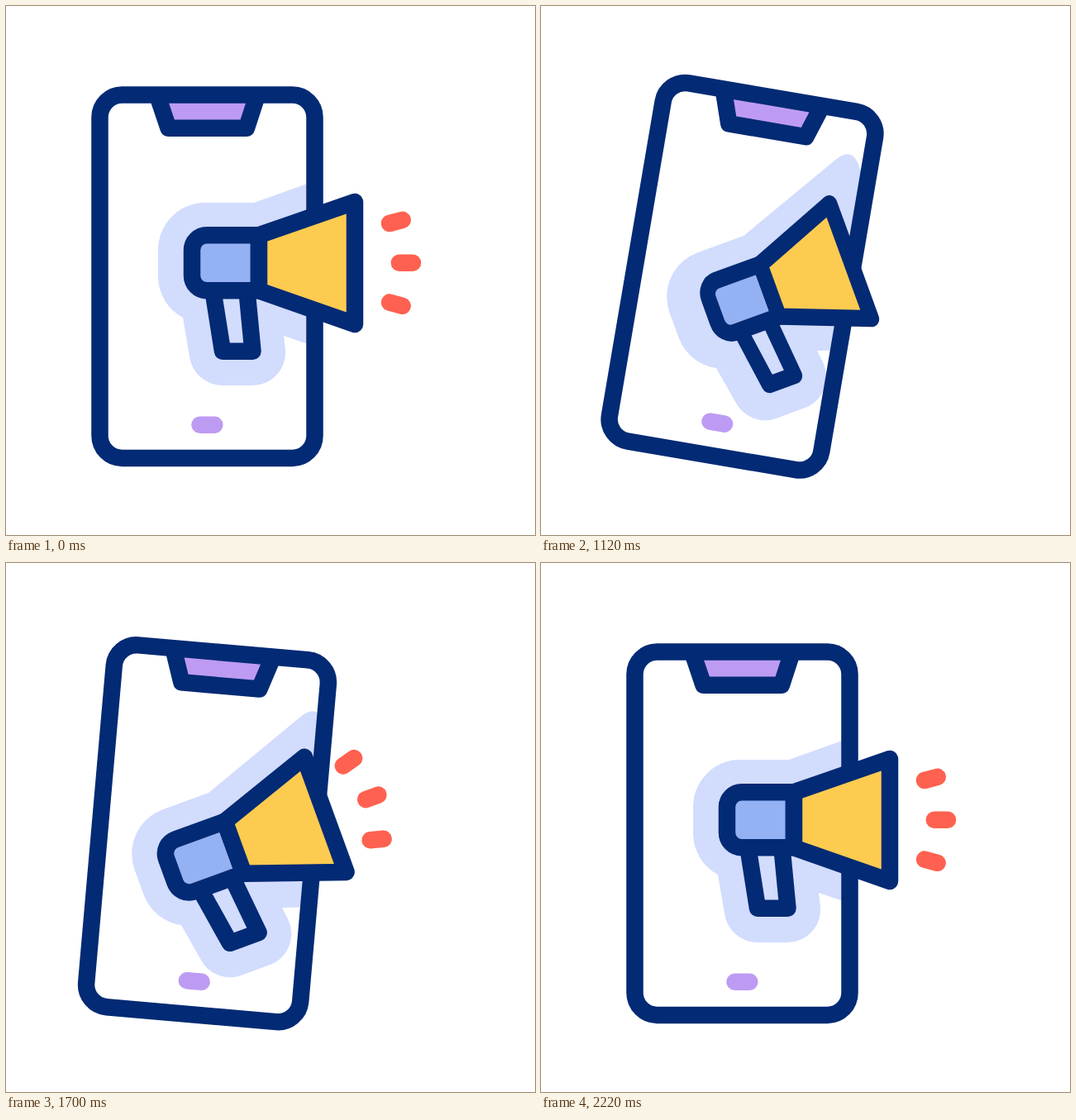
An HTML page for the animation above (2420 ms loop, 640 by 640 pixels).

```html
<!DOCTYPE html>
<html lang="en">
<head>
<meta charset="utf-8">
<title>Phone and megaphone</title>
<style>
  html, body { margin: 0; height: 100%; overflow: hidden; background: #fff; }
  svg { display: block; width: 100%; height: 100%; }
  .line { fill: none; stroke: #032a74; stroke-width: 20.5; stroke-linejoin: round; }
  .dash { fill: none; stroke: #be9bf3; stroke-width: 20.5; stroke-linecap: round; }
  #rays .dash { stroke: #ff6150; }
</style>
</head>
<body>
<svg viewBox="0 0 640 640">
  <clipPath id="screen"><rect id="screenRect" x="113.5" y="107.5" width="260" height="439.5" rx="27"/></clipPath>

  <g clip-path="url(#screen)">
    <path id="halo" fill="#d2dcfd" d="M241 238H300L436 189.5Q460 181 460 205V416Q460 441 436 433L336 399
      L338 416A40 40 0 0 1 298 459H262A40 40 0 0 1 222 424L214 377A57 57 0 0 1 184 327V295A57 57 0 0 1 241 238Z"/>
  </g>

  <g id="phone">
    <path class="line" style="fill:#be9bf3" d="M183 107.7L196.5 147.7H291L304 107.7"/>
    <rect class="line" x="113.5" y="107.5" width="260" height="439.5" rx="27"/>
    <path class="dash" d="M234.5 506.7H252.3"/>
  </g>

  <g id="horn">
    <path class="line" d="M250.5 345L262 417.7H298.5L291.5 345"/>
    <path class="line" style="fill:#94b1f3" d="M306 277.3H243a18 18 0 0 0-18 18v31a18 18 0 0 0 18 18H306Z"/>
    <path class="line" style="fill:#fdcb50" d="M306 277.3L422 237V385L306 344.3Z"/>
  </g>

  <g id="rays">
    <path class="dash" transform="translate(464 263) rotate(-15)"/>
    <path class="dash" transform="translate(475.8 310.7)"/>
    <path class="dash" transform="translate(464 358.6) rotate(15)"/>
  </g>
</svg>
<script>
const LOOP = 2420, STEP = 20, RAY = 16.2;
const $ = id => document.getElementById(id);
const rays = [...$('rays').children];

function ease(t, from, to) {
  const p = Math.min(1, Math.max(0, (t - from) / (to - from)));
  return p * p * (3 - 2 * p);
}

// Eased value through [time, value] keys
function track(t, keys) {
  let value = keys[0][1];
  for (let i = 1; i < keys.length; i++) {
    value += (keys[i][1] - keys[i - 1][1]) * ease(t, keys[i - 1][0], keys[i][0]);
  }
  return value;
}

function draw(t) {
  // Two full swings of the phone
  const shake = t > 1020 && t < 1980 ? 10 * Math.sin((t - 1020) / 240 * Math.PI) : 0;
  const phoneTurn = `rotate(${shake} 243.4 327.2)`;
  $('phone').setAttribute('transform', phoneTurn);
  $('screenRect').setAttribute('transform', phoneTurn);

  const tilt = track(t, [[400, 0], [1000, -20], [1755, -20], [2220, 0]]);
  const hornTurn = `rotate(${tilt} 386 413.5)`;
  $('halo').setAttribute('transform', hornTurn);
  $('rays').setAttribute('transform', hornTurn);

  // Squash before the blast, stretch with it
  const stretch = track(t, [[1000, 1], [1200, 0.843], [1500, 1.076], [1755, 1]]);
  const push = track(t, [[1200, 0], [1500, 4.5], [1755, 0]]);
  $('horn').setAttribute('transform',
    `${hornTurn} translate(${315 + push}) scale(${stretch} 1) translate(-315)`);

  const leave = t < 1000 ? ease(t, 0, 200) : 0;
  const grow = t < 1000 ? 1 : ease(t, 1300, 1560);
  const start = (RAY + 9) * leave, end = RAY * grow + 9 * leave;
  const d = end - start > 0.01 ? `M${start} 0H${end}` : '';
  rays.forEach(ray => ray.setAttribute('d', d));
}

const begin = performance.now();
function tick() {
  const t = (performance.now() - begin) % LOOP;
  draw(Math.floor(t / STEP) * STEP);
  requestAnimationFrame(tick);
}
tick();
</script>
</body>
</html>
```
